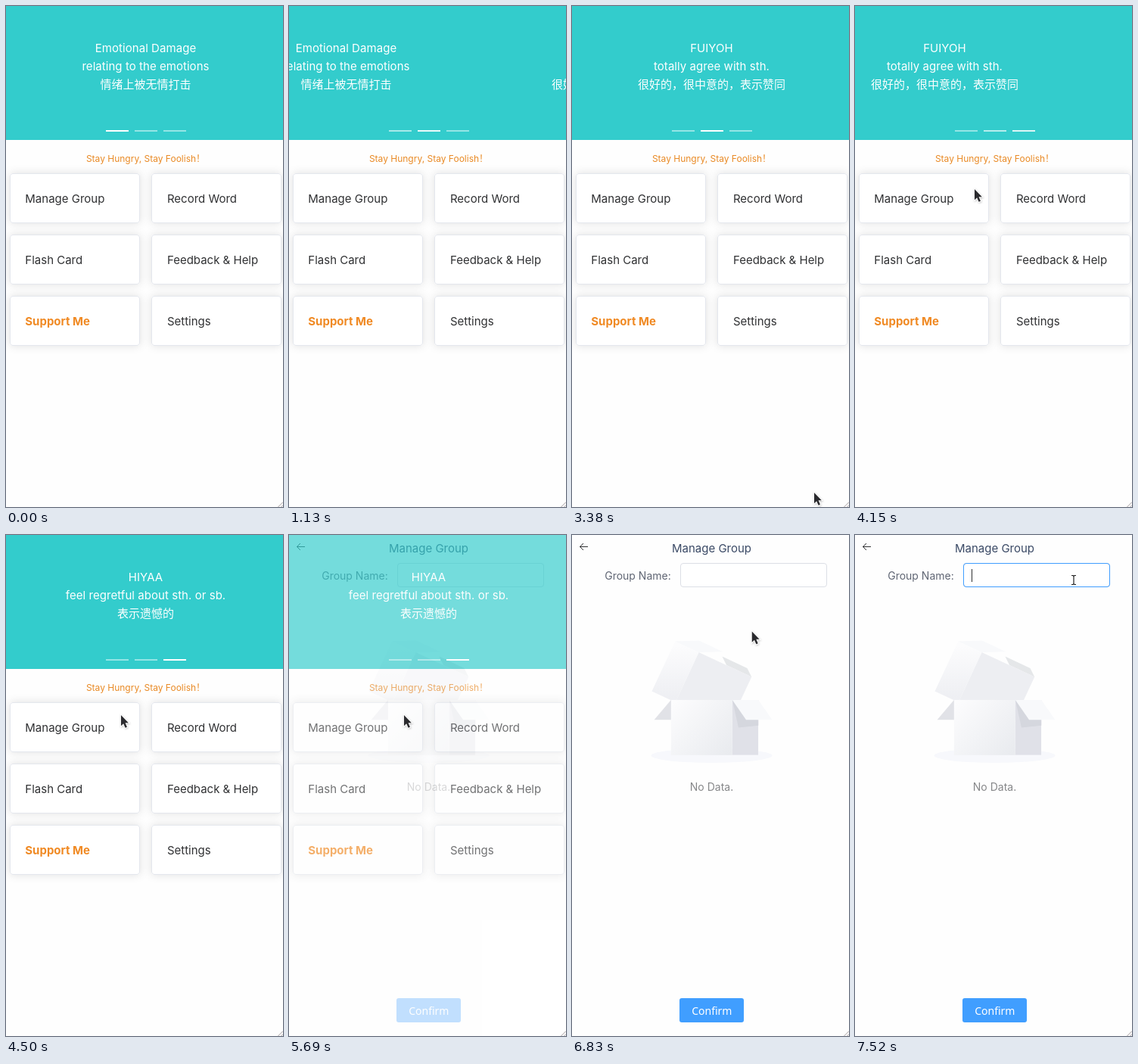
An HTML page for the animation above (8 s loop, 366 px wide and 662 px high).

```html
<!DOCTYPE html>
<html lang="zh-CN">
<head>
<meta charset="utf-8">
<title>Word cards</title>
<style>
  html, body { margin: 0; width: 100%; height: 100%; overflow: hidden; background: #fefefe; }
  svg { display: block; width: 100%; height: 100%; }
  text { font: 15px Inter, "Noto Sans CJK SC", "Noto Sans CJK", sans-serif; white-space: pre; }
  .mid { text-anchor: middle; }
  .small { font-size: 12px; }
  .form { font-size: 14px; }
  .button { font: 500 14px "Noto Sans", sans-serif; }
  .bold { font-weight: 700; }
  .latin { letter-spacing: .05px; }
</style>
</head>
<body>
<svg viewBox="0 0 366 662" xmlns="http://www.w3.org/2000/svg">
  <defs>
    <filter id="shadow" x="-20%" y="-40%" width="140%" height="180%">
      <feDropShadow dx="0" dy="0" stdDeviation="6" flood-color="#000" flood-opacity=".12"/>
    </filter>
    <filter id="soft" x="-50%" y="-50%" width="200%" height="200%">
      <feDropShadow dx=".5" dy="1" stdDeviation=".8" flood-color="#000" flood-opacity=".25"/>
    </filter>
    <linearGradient id="lid" x1=".3885" y1="0" x2=".6115" y2="1">
      <stop offset="0" stop-color="#fcfcfd"/><stop offset="1" stop-color="#eeeff3"/>
    </linearGradient>
    <linearGradient id="front" x1="0" y1=".095" x2="1" y2=".905">
      <stop offset="0" stop-color="#fcfcfd"/><stop offset="1" stop-color="#e9ebef"/>
    </linearGradient>
    <clipPath id="side"><rect width="17" height="36"/></clipPath>
  </defs>

  <rect width="366" height="662" fill="#fefefe"/>

  <g id="home">
    <rect width="366" height="177" fill="#33cccc"/>
    <g id="slides" class="mid" fill="#fff"></g>
    <g id="bars" fill="#fff"></g>
    <text class="mid small" x="184.5" y="206" fill="#e98a25">Stay Hungry, Stay Foolish！</text>
    <g id="cards"></g>
  </g>

  <g id="group">
    <rect width="366" height="662" fill="#fefefe"/>
    <path d="M21 15.5H10.5M15 11l-4.5 4.5L15 20" fill="none" stroke="#303133"/>
    <text class="mid" x="184.5" y="23" fill="#3b4a66">Manage Group</text>
    <text class="form" x="43.2" y="59" fill="#606674">Group Name:</text>
    <rect x="143.5" y="37.5" width="193" height="31" rx="3.5" fill="#fff" stroke="#dcdfe6"/>
    <rect id="focus" x="143.5" y="37.5" width="193" height="31" rx="3.5" fill="none" stroke="#409eff"/>
    <rect id="caret" x="154" y="45" width="1" height="17" fill="#303133"/>

    <g transform="translate(104.5 126.8) scale(2.0253)">
      <ellipse cx="39.5" cy="81.3" rx="39.5" ry="4.7" fill="#f7f8fc"/>
      <path d="M13 45H53L42 58H2Z" fill="#e1e2e7"/>
      <g transform="translate(34.5 31.5) scale(-1 1) rotate(-25) translate(-27.5 -21.5)">
        <path d="M0 7H18L23 3H5Z" fill="#e5e7e9"/>
        <path d="M0 7H38V43H0Z" fill="#edeef2"/>
        <rect x="38" y="7" width="17" height="36" fill="url(#lid)" transform="translate(93) scale(-1 1)"/>
        <path d="M55 7H38L24 0H41Z" fill="#f8f9fb"/>
      </g>
      <rect x="13" y="45" width="40" height="36" fill="url(#front)"/>
      <g transform="translate(53 45)" clip-path="url(#side)">
        <rect width="17" height="36" fill="#e0e1e8"/>
        <path d="M17 0H0L4 18L24 16Z" fill="#d5d7de"/>
      </g>
      <path d="M70 45H53L62 58H79Z" fill="#f8f9fb"/>
    </g>

    <text class="mid form" x="184.5" y="338" fill="#868789">No Data.</text>
    <rect x="142" y="612" width="85" height="32" rx="3" fill="#409eff"/>
    <text class="mid button" x="184.8" y="634" fill="#fff">Confirm</text>
  </g>

  <path d="M359.5 662L366 655.5M363.5 662L366 659.5" stroke="#a39a9c" fill="none"/>

  <g id="arrow" filter="url(#soft)">
    <path d="M.5 .5V16L4 12.7L6.6 18.7L9.2 17.6L6.6 11.7H11.3Z" transform="translate(.5 .5) scale(.92)"
      fill="#2b2b2d" stroke="#fff" stroke-width="1.8" paint-order="stroke"/>
  </g>
  <g id="beam" fill="none">
    <path d="M-3-6H3M0-6V6M-3 6H3" stroke="#fff" stroke-width="3"/>
    <path d="M-3-6H-1L0-5L1-6H3M0-5V5M-3 6H-1L0 5L1 6H3" stroke="#222" stroke-width="1.2"/>
  </g>
</svg>

<script>
const LOOP = 8000, SLIDE_W = 369, SLIDE_MS = 450;
const SLIDE_AT = [965, 4029];
// Bursts of motion: start, end, number of steps
const BURSTS = [
  [990, 1470, 8], [3380, 4150, 12], [4220, 4500, 5],
  [5690, 5820, 3], [6480, 7110, 10], [7310, 7520, 4]
];
const SLIDES = [
  ["Emotional Damage", "relating to the emotions", "情绪上被无情打击"],
  ["FUIYOH", "totally agree with sth.", "很好的，很中意的，表示赞同"],
  ["HIYAA", "feel regretful about sth. or sb.", "表示遗憾的"]
];
const CARDS = ["Manage Group", "Record Word", "Flash Card", "Feedback & Help", "Support Me", "Settings"];

const $ = id => document.getElementById(id);
const clamp = p => Math.min(1, Math.max(0, p));
const span = (t, a, b) => clamp((t - a) / (b - a));
const smooth = p => p * p * (3 - 2 * p);
const easeOut = (p, power) => 1 - (1 - p) ** power;
const mix = (a, b, p) => a + (b - a) * p;

function add(parent, tag, attrs, text) {
  const el = document.createElementNS("http://www.w3.org/2000/svg", tag);
  for (const k in attrs) el.setAttribute(k, attrs[k]);
  if (text) el.textContent = text;
  return parent.appendChild(el);
}
const set = (id, name, value) => $(id).setAttribute(name, value);

SLIDES.forEach((lines, i) => lines.forEach((line, j) =>
  add($("slides"), "text", { x: 184.5 + i * SLIDE_W, y: 61 + j * 24, class: j < 2 ? "latin" : "" }, line)));

const bars = SLIDES.map((_, i) =>
  add($("bars"), "rect", { x: 132 + i * 38, y: 164, width: 30, height: 2 }));

CARDS.forEach((label, i) => {
  const right = i % 2, y = 221 + 81 * (i >> 1), strong = i === 4;
  add($("cards"), "rect", { x: right ? 192.5 : 5.5, y: y + .5, width: 171, height: 65, rx: 3.5,
    fill: "#fff", stroke: "#e4e7ed", filter: "url(#shadow)" });
  add($("cards"), "text", { x: right ? 212.9 : 25.3, y: y + 39,
    fill: strong ? "#f08a24" : "#303133", class: strong ? "bold" : "" }, label);
});

// Time of the latest step at or before t
function held(t) {
  let h = 0;
  for (const [a, b, n] of BURSTS) {
    const gap = (b - a) / (n - 1);
    if (t >= a) h = Math.min(b, a + Math.floor((t - a) / gap + 1e-6) * gap);
  }
  return h;
}

function pointer(t) {
  const along = (a, b, p) => [mix(a[0], b[0], p), mix(a[1], b[1], p)];
  const enter = [319, 642], near = [157, 241], rest = [151, 237], field = [289, 59.5];
  if (t < 4150) return along(enter, near, easeOut(span(t, 3380, 4150), 1.6));
  if (t < 6440) return along(near, rest, easeOut(span(t, 4150, 4500), 1.6));
  return along(rest, field, smooth(span(t, 6440, 7110)));
}

function draw(now) {
  const t = held(now);

  const shift = SLIDE_AT.reduce((s, a) => s + smooth(span(t, a, a + SLIDE_MS)), 0);
  set("slides", "transform", `translate(${-Math.round(shift * SLIDE_W)} 0)`);
  const active = SLIDE_AT.reduce((s, a) => s + easeOut(span(t, a, a + 300), 2.2), 0);
  bars.forEach((bar, i) =>
    bar.setAttribute("opacity", mix(.48, 1, clamp(1 - Math.abs(active - i)))));

  set("group", "opacity", span(t, 5630, 5820));
  set("focus", "opacity", span(t, 7260, 7520));
  set("caret", "opacity", t >= 7310 ? 1 : 0);

  const [x, y] = pointer(t);
  const typing = y < 69;
  const at = `translate(${x.toFixed(1)} ${y.toFixed(1)})`;
  set("arrow", "transform", at);
  set("beam", "transform", at);
  set("arrow", "visibility", t >= 3380 && !typing ? "visible" : "hidden");
  set("beam", "visibility", typing ? "visible" : "hidden");
}

const begin = performance.now();
function tick() {
  draw((performance.now() - begin) % LOOP);
  requestAnimationFrame(tick);
}
tick();
</script>
</body>
</html>
```
